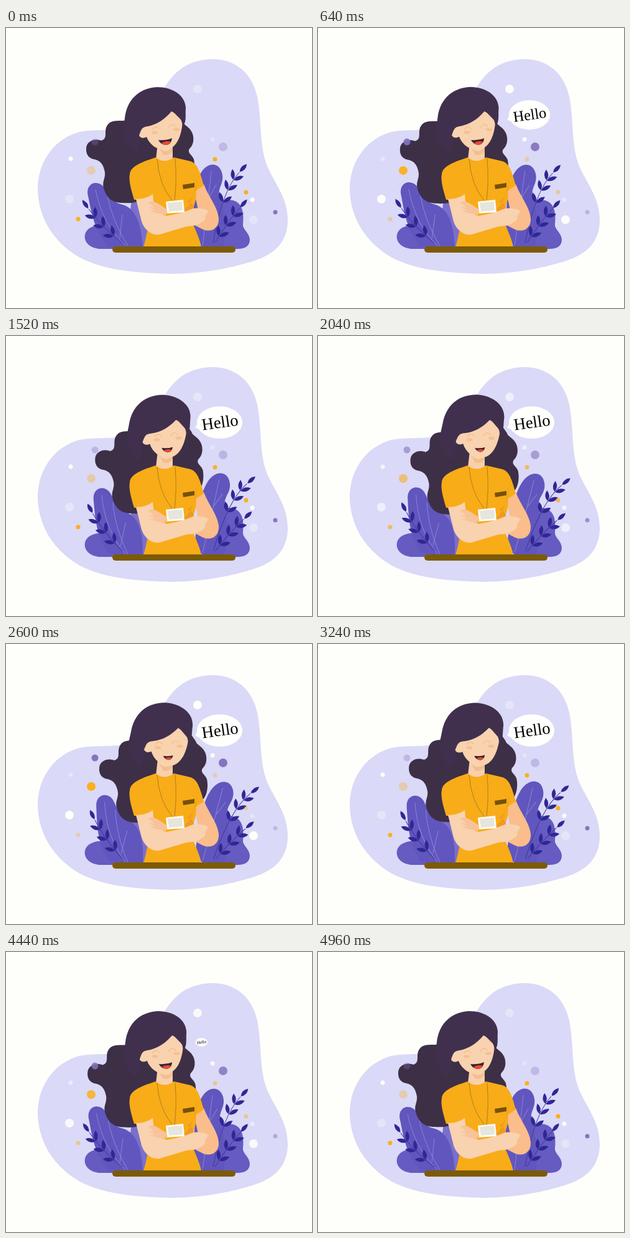
These frames come from a looping animation (492x450 px, 5000 ms). An HTML page:

```html
<!DOCTYPE html>
<html lang="en">
<head>
<meta charset="utf-8">
<title>Hello</title>
<style>
html, body { margin: 0; width: 100%; height: 100%; overflow: hidden; background: #fefefb; }
svg { display: block; width: 100vw; height: 100vh; }
.stem { fill: none; stroke: #40369f; stroke-width: 1; }
.vein { fill: none; stroke: #8b82da; stroke-width: 1; }
.leaf { fill: #2f2794; }
.mound { fill: #655bc0; }
.frond { fill: #6056bd; }
.line, .dot { fill: none; stroke-linecap: round; }
.white { stroke: #fffffd; }
.orange { stroke: #fbb019; }
.purple { stroke: #8474be; }
.big { stroke-width: 14; }
.small { stroke-width: 7; }
</style>
</head>
<body>
<svg viewBox="0 0 492 450">
  <path fill="#dad9f7" d="M330 50C375 49 401 80 406 122C411 160 408 190 420 222C432 250 453 272 453 310C452 350 425 369 382 379C340 391 300 395 265 395C205 394 140 388 102 358C68 332 51 295 51 257C52 212 80 177 118 167C150 160 195 172 222 145C243 122 250 98 267 79C284 59 305 51 330 50Z"/>

  <path class="mound" d="M150 355C132 353 125 342 127 332C131 318 147 316 165 316L225 300V355Z"/>
  <path class="mound" d="M315 355V300C328 275 345 274 365 277C380 281 383 297 381 315C380 324 391 328 392 340C392 350 385 355 372 355Z"/>
  <path fill="#7a70cb" d="M203 355C190 330 200 300 202 275L232 270V355Z"/>

  <g id="leftPlant">
    <path class="frond" d="M165 352C142 325 138 300 132 270C127 249 147 243 157 255C166 267 172 280 184 283C200 286 217 300 220 352Z"/>
    <path class="vein" d="M144 260Q155 315 192 350M163 270Q171 310 196 350M183 338L187 300"/>
  </g>
  <g id="rightPlant">
    <path class="frond" d="M303 352C301 310 300 262 310 240C319 216 341 213 347 232C352 248 341 255 343 268C347 290 357 310 350 352Z"/>
    <path class="vein" d="M330 230Q324 290 316 350M325 275L338 252M322 295L311 270"/>
  </g>

  <path id="backHair" fill="#3d2f46" d="M190 149C180 149 175 149 172 150C163 152 160 160 160 167C160 175 160 179 153 181C143 177 130 181 129 193C128 205 135 210 142 211C152 213 157 220 159 232C160 242 154 247 157 257C161 272 170 281 187 281C201 282 213 281 221 273L290 247C302 244 305 224 302 211C299 203 291 201 295 194C304 186 302 172 298 166C294 158 285 156 284 150L270 130L220 118Z"/>

  <path fill="#fabd8b" d="M301 257L318 251C325 270 340 287 342 305C343 322 331 329 317 324L288 309L309 292Z"/>
  <path fill="#f9d0ad" d="M244 185H268V211L258 224L241 211Z"/>
  <path fill="#f3bf90" d="M246 192Q258 203 268 192V198Q261 207 252 203Z"/>
  <path fill="#f8ac17" d="M241 208Q254 219 270 208L296 214C308 217 312 232 318 253L305 262C308 278 300 286 297 306C303 322 311 336 314 352H221C226 335 230 318 228 300L234 269Q221 277 206 276C201 259 197 245 199 235C200 222 219 215 241 208Z"/>
  <path fill="#f09a22" d="M307 240Q308 275 287 280Q304 278 302 296L291 302L285 292Q303 283 307 240Z"/>
  <path fill="#f9d2af" d="M209 275Q222 276 236 267L239 294L258 302Q283 298 301 290Q318 288 326 295Q320 300 320 308Q312 318 290 319L250 331C236 336 222 324 218 311Z"/>
  <path fill="#f8c39a" d="M229 280Q237 277 246 283L258 291V300L242 298L232 294L240 293L229 288L238 288Z"/>
  <path class="line" stroke="#9a7423" stroke-width=".8" d="M243 211Q246 252 267 277M272 210Q275 249 271 277"/>
  <path fill="#fffdf4" d="M257 279L285 276L287 296L259 298Z"/>
  <path fill="#e6e5de" d="M260 281L283 279L284 293L262 295Z"/>
  <path fill="#75510e" d="M284 252L303 249V256L285 259Z"/>

  <g id="head">
    <path fill="#f9d2af" d="M264 130L230 150L224 159C213 158 211 166 214 173C217 178 222 177 226 175C231 188 243 196 256 196C273 194 282 177 284 150Z"/>
    <path fill="#40304d" d="M243 95C268 95 288 108 289 128C288 140 291 151 284 158C283 147 279 140 266 134C255 147 243 155 228 158C217 159 217 165 214 173C217 181 216 194 207 203L190 180C186 168 190 155 191 145C194 118 211 97 243 95Z"/>
    <g id="features">
      <path class="line" stroke="#ecbb7c" d="M235 163Q240 155 246 162M261 160Q266 151 272 158"/>
      <g fill="#f6c093">
        <ellipse cx="239" cy="168" rx="5" ry="2.5"/>
        <ellipse cx="274" cy="163" rx="5" ry="2.5"/>
      </g>
      <g id="mouth">
        <path fill="#3a2338" d="M245 180Q257 181 267 177Q266 187 258 188Q249 188 245 180Z"/>
        <path fill="#e94a30" d="M250 185Q257 180 265 183Q262 188 257 188Q253 188 250 185Z"/>
      </g>
    </g>
  </g>

  <rect x="171" y="351" width="198" height="10" rx="5" fill="#7c5b05"/>

  <g id="dotsA">
    <path class="dot big white" d="M308 98h0M102 275h0M398 308h0"/>
    <path class="dot big purple" d="M349 191h0"/>
    <path class="dot big orange" d="M137 229h0"/>
    <path class="dot small white" d="M332 179h0"/>
    <path class="dot purple" stroke-width="11" d="M143 183h0"/>
  </g>
  <g id="dotsB">
    <path class="dot small white" d="M104 210h0M396 276h0"/>
    <path class="dot small orange" d="M336 211h0M386 264h0M116 307h0"/>
    <path class="dot small purple" d="M433 296h0"/>
  </g>

  <g id="bubble">
    <path fill="#fffffd" d="M304 147L311 136L316 153Z"/>
    <ellipse cx="343.5" cy="139" rx="36.5" ry="26" fill="#fffffd"/>
    <text transform="translate(316 151.5) rotate(-8)" font-size="26.5" font-family="'Liberation Serif', 'Times New Roman', serif">Hello</text>
  </g>
</svg>
<script>
const LOOP = 5000;
const $ = id => document.getElementById(id);

function addPath(parent, className, d, transform = '') {
  const path = document.createElementNS('http://www.w3.org/2000/svg', 'path');
  path.setAttribute('class', className);
  path.setAttribute('d', d);
  path.setAttribute('transform', transform);
  parent.append(path);
}

// Leaf pairs along a quadratic stem, from `start` to a single leaf at the tip
function branch(parent, [x0, y0], [x1, y1], [x2, y2], start) {
  addPath(parent, 'stem', `M${x0} ${y0}Q${x1} ${y1} ${x2} ${y2}`);
  const point = (t, a, b, c) => (1 - t) ** 2 * a + 2 * t * (1 - t) * b + t * t * c;
  const slope = (t, a, b, c) => (1 - t) * (b - a) + t * (c - b);
  const pairs = 3;
  for (let i = 0; i <= pairs; i++) {
    const t = start + (1 - start) * i / pairs;
    const tilt = Math.atan2(slope(t, x0, x1, x2), -slope(t, y0, y1, y2)) * 180 / Math.PI;
    for (const side of i < pairs ? [-36, 36] : [0])
      addPath(parent, 'leaf', 'M0 -1Q6.5 -9 0 -18Q-6.5 -9 0 -1Z',
        `translate(${point(t, x0, x1, x2)} ${point(t, y0, y1, y2)}) rotate(${tilt + side})`);
  }
}
branch($('leftPlant'), [187, 346], [152, 318], [133, 291], 0.2);
branch($('rightPlant'), [333, 345], [347, 262], [375, 232], 0.45);
branch($('rightPlant'), [336, 345], [356, 312], [376, 289], 0.15);

// Cubic Bézier easing, solved by bisection
const bezier = (x1, y1, x2, y2) => k => {
  const at = (u, a, b) => 3 * u * (1 - u) ** 2 * a + 3 * u * u * (1 - u) * b + u ** 3;
  let low = 0, high = 1;
  for (let i = 0; i < 20; i++) {
    const mid = (low + high) / 2;
    if (at(mid, x1, x2) < k) low = mid; else high = mid;
  }
  return at(low, y1, y2);
};
const ease = bezier(0.25, 0.1, 0.25, 1);
const easeInOut = bezier(0.42, 0, 0.58, 1);
const clamp = k => Math.min(1, Math.max(0, k));
const backAndForth = (t, period) => easeInOut(1 - Math.abs(1 - 2 * (t % period) / period));
const move = (id, transform) => $(id).setAttribute('transform', transform);

function draw() {
  const t = performance.now() % LOOP;
  const sway = backAndForth(t, LOOP);
  move('leftPlant', `rotate(${9 * sway} 190 350)`);
  move('rightPlant', `rotate(${9 * sway} 330 350)`);
  move('backHair', `translate(${21 * sway} ${6 * sway})`);
  move('head', `translate(${4.5 * sway} 0) rotate(${4.5 * sway} 256 215)`);
  move('features', `translate(${-3 * sway} 0)`);
  move('mouth', `translate(257 182) scale(${1 - 0.28 * sway}) translate(-257 -182)`);

  const glow = backAndForth(t, LOOP / 3);
  $('dotsA').setAttribute('opacity', 0.3 + 0.7 * glow);
  $('dotsB').setAttribute('opacity', 1 - 0.7 * glow);

  const size = ease(clamp(t / 1000)) - ease(clamp((t - 4000) / 1000));
  move('bubble', `translate(304 147) scale(${size}) translate(-304 -147)`);
  requestAnimationFrame(draw);
}
draw();
</script>
</body>
</html>
```
